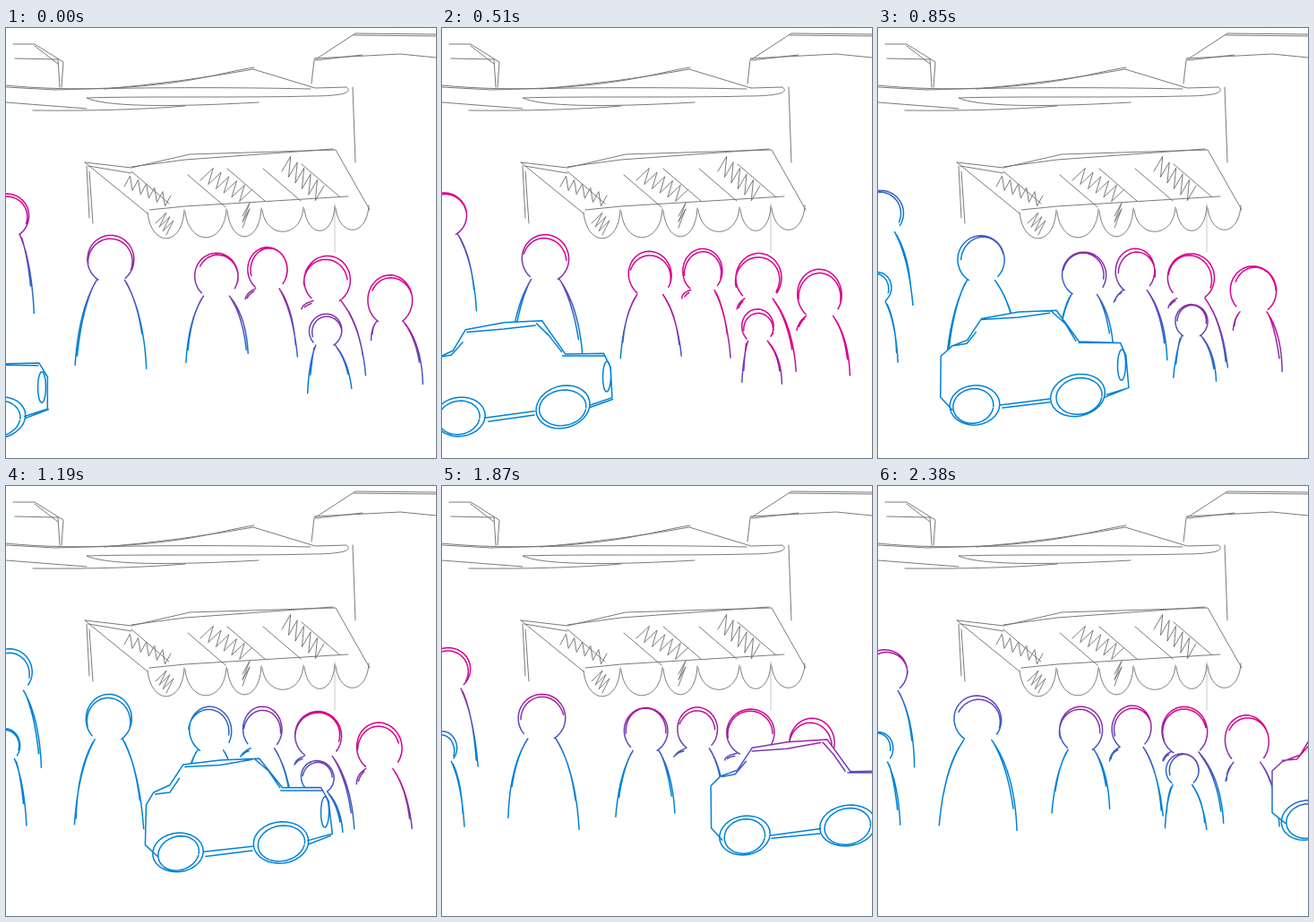
An HTML page for the animation above (2.55 s loop, 480 by 480 pixels).

```html
<!DOCTYPE html>
<html lang="en">
<head>
<meta charset="utf-8">
<title>Street sketch</title>
<style>
html, body { margin: 0; height: 100%; overflow: hidden; background: #fff; }
svg { display: block; width: 100vw; height: 100vh; }
path { fill: none; stroke-linecap: round; stroke-linejoin: round; }
.street { stroke: #77707a; stroke-width: .95; }
.cel { opacity: 0; stroke-width: 1.5; animation: show 2550ms step-end infinite; }
.cel .fill { fill: #fff; stroke: none; }
@keyframes show { 0% { opacity: 1; } 6.66667% { opacity: 0; } 100% { opacity: 0; } }
</style>
</head>
<body>
<svg id="stage" viewBox="0 0 480 480">
  <g class="street" id="street">
    <path d="M8 18H32L64 38L62 66M10 34L58 35L60 66M32 20L58 40"/>
    <path d="M0 64C40 68 100 70 160 64S240 50 277 44M0 66L55 69C150 66 250 66 340 68M110 68Q200 60 276 46L345 67L380 66C388 72 375 76 340 76C270 78 150 76 90 78Q120 92 282 83M0 83L90 90M30 92Q130 93 200 87"/>
    <path d="M341 62L344 36L390 6L480 7M388 8L480 9M344 34L440 29L480 33M346 36L398 30M387 66L390 150"/>
    <path d="M88 150L140 156L205 141L368 136L406 203M92 154L140 162M140 155L200 147L365 135M88 150L158 207M160 203L200 199L382 188M90 154L93 212M93 160L97 218"/>
    <path d="M367 196V250" opacity=".4"/>
  </g>
</svg>
<script>
const stage = document.getElementById("stage");
const street = document.getElementById("street");
const inks = ["#d9008d", "#6b42b4", "#0082d6"];

// head x, y at start and end of the loop, head radii, left and right foot from the head
const people = [
  [2, 209, 6, 206, 25, 25, -40, 100, 33, 106],
  [118, 257, 111, 260, 26, 27, -40, 115, 41, 122],
  [235, 276, 226, 273, 24, 26, -31, 94, 33, 88],
  [293, 271, 283, 271, 22, 25, -24, 34, 33, 98],
  [358, 281, 342, 275, 26, 27, -26, 33, 42, 103],
  [428, 304, 411, 284, 25, 28, -23, 42, 34, 93],
  [358, 339, 341, 318, 18, 19, -20, 66, 27, 64],
  [-2, 286, 1, 293, 16, 18, -30, 60, 22, 86]
];
const CHILD = 6, LEFT_CHILD = 7;

// step, rear wheel x, y, slope of the colour bands, levels of magenta and blue
const keys = [
  [0, -124, 446, .25, 190, 305],
  [3, 20, 434, .45, 185, 275],
  [5, 108, 421, .5, 100, 205],
  [7, 192, 409, .7, 5, 120],
  [9, 270, 397, .4, 110, 205],
  [11, 338, 390, .15, 200, 290],
  [14, 478, 373, .25, 165, 255]
];

// car lines, measured from the rear wheel
const body = [[-24, 4], [-37, -8], [-37, -54], [-26, -66], [-8, -74], [7, -98], [48, -104],
  [91, -106], [117, -71], [161, -71], [169, -56], [171, -20], [146, -12]];
const trim = [
  [[8, -95], [48, -98], [84, -103]],
  [[86, -104], [100, -90], [113, -72]],
  [[115, -69], [160, -69]],
  [[-26, -66], [-10, -68], [2, -82]],
  [[145, -10], [171, -19]],
  [[29, 0], [84, -7]],
  [[31, 4], [84, -3]]
];

function seeded(seed) {
  let s = seed * 7919 + 17;
  return amount => {
    s = (s * 16807) % 2147483647;
    return (s / 2147483647 * 2 - 1) * amount;
  };
}

function add(parent, tag, attrs) {
  const el = document.createElementNS("http://www.w3.org/2000/svg", tag);
  for (const name in attrs) el.setAttribute(name, attrs[name]);
  return parent.appendChild(el);
}

const line = points => "M" + points.map(p => p.map(v => v.toFixed(1)).join(" ")).join("L");

// Hand-drawn arc, angles in degrees, clockwise from the right
function arc(x, y, rx, ry, from, to, rnd, tilt = 0) {
  const phase = rnd(3), dent = rnd(.03);
  const c = Math.cos(tilt), s = Math.sin(tilt);
  return line(Array.from({ length: 33 }, (_, i) => {
    const a = (from + (to - from) * i / 32) * Math.PI / 180;
    const k = 1 + dent * Math.sin(2 * a + phase);
    const u = rx * k * Math.cos(a), v = ry * k * Math.sin(a);
    return [x + u * c - v * s, y + u * s + v * c];
  }));
}

function limb(x, y, footX, footY, reach, rnd) {
  const bendX = footX + (x - footX) * .15 + rnd(2), bendY = y + (footY - y) * .35;
  return line(Array.from({ length: 13 }, (_, i) => {
    const t = reach * i / 12, q = 1 - t;
    return [q * q * x + 2 * q * t * bendX + t * t * footX, q * q * y + 2 * q * t * bendY + t * t * footY];
  }));
}

function person([x0, y0, x1, y1, rx, ry, lx, ly, fx, fy], step, rnd) {
  const u = (step / 14) ** .7;
  const x = x0 + (x1 - x0) * u + rnd(1.5), y = y0 + (y1 - y0) * u + rnd(1.5);
  const neck = y + ry * .85;
  let d = arc(x, y, rx, ry, 130 + rnd(12), 405 + rnd(14), rnd);
  d += arc(x + rnd(2), y + 2 + rnd(2), rx - 1.5, ry - 1, 185 + rnd(25), 365 + rnd(25), rnd);
  for (const [side, dx, dy] of [[-1, lx, ly], [1, fx, fy]]) {
    const startX = x + side * rx * .6, footX = x + dx + rnd(3), footY = y + dy + rnd(4);
    d += limb(startX, neck, footX, footY, 1, rnd);
    d += limb(startX + side * 2, neck + 3, footX - side * 1.5, footY, .8 + rnd(.15), rnd);
  }
  return d;
}

function drawCar(cel, x, y, rnd) {
  const shaky = (points, amount) => line(points.map(([px, py]) => [x + px + rnd(amount), y + py + rnd(amount)]));
  const outline = shaky(body, 1.5);
  add(cel, "path", { class: "fill", d: outline });
  let d = outline + trim.map(points => shaky(points, 1.2)).join("");
  for (const [wx, wy, rx, ry] of [[0, 0, 28, 22], [115, -11, 31, 23]]) {
    d += arc(x + wx, y + wy, rx, ry, 0, 370, rnd, -.2);
    d += arc(x + wx + rnd(2), y + wy + 1, rx - 5, ry - 3, 20, 375, rnd, -.2);
  }
  d += arc(x + 164, y - 45, 4.5, 17, 0, 365, rnd);
  add(cel, "path", { d });
}

function stateAt(step) {
  const next = keys.find(k => k[0] >= step);
  const prev = keys.findLast(k => k[0] <= step);
  const u = next === prev ? 0 : (step - prev[0]) / (next[0] - prev[0]);
  return prev.map((v, i) => v + (next[i] - v) * u);
}

function addInk(id, slope, top, bottom) {
  const point = level => [-slope, 1].map(n => n * level / (1 + slope * slope));
  const [x1, y1] = point(top), [x2, y2] = point(bottom);
  const ink = add(stage, "linearGradient", { id, x1, y1, x2, y2, gradientUnits: "userSpaceOnUse" });
  inks.forEach((color, i) => add(ink, "stop", { offset: i / 2, "stop-color": color }));
}

function visible(who, step) {
  if (who === CHILD) return step < 8 || step > 11;
  return who !== LEFT_CHILD || step > 3;
}

function zigzag(x0, y0, x1, y1, turns, dx, dy) {
  return line(Array.from({ length: turns + 1 }, (_, i) => {
    const t = i / turns, side = i % 2 ? 1 : -1;
    return [x0 + (x1 - x0) * t + side * dx, y0 + (y1 - y0) * t - side * dy];
  }));
}

function drawAwning() {
  let d = zigzag(133, 170, 183, 194, 11, 1, 7) + zigzag(222, 162, 270, 188, 11, 5, 8)
    + zigzag(311, 150, 352, 186, 11, 3, 10) + zigzag(172, 211, 184, 224, 6, 5, 7)
    + zigzag(268, 201, 268, 214, 4, 4, 9);
  for (const [x, y] of [[140, 160], [203, 164], [247, 157], [287, 157], [330, 152]]) {
    d += line([[x, y], [x + 42, y + 36]]);
  }
  const edges = [158, 200, 247, 286, 333, 368, 406];
  edges.slice(1).forEach((right, i) => {
    const left = edges[i], top = 206 - i, low = top + (i < 3 ? 39 : 33);
    d += `M${left} ${top}C${left + 4} ${low} ${right - 3} ${low} ${right - 1} ${top - 3}`;
  });
  add(street, "path", { d });
}

drawAwning();
for (let step = 0; step < 15; step++) {
  const [, x, y, ...tint] = stateAt(step);
  const rnd = seeded(step + 1);
  addInk("ink" + step, ...tint);
  const cel = add(stage, "g", {
    class: "cel", stroke: `url(#ink${step})`, style: `animation-delay:${step * 170 - 2550}ms`
  });
  people.forEach((who, i) => {
    if (visible(i, step)) add(cel, "path", { d: person(who, step, rnd) });
  });
  drawCar(cel, x, y, rnd);
}
</script>
</body>
</html>
```
